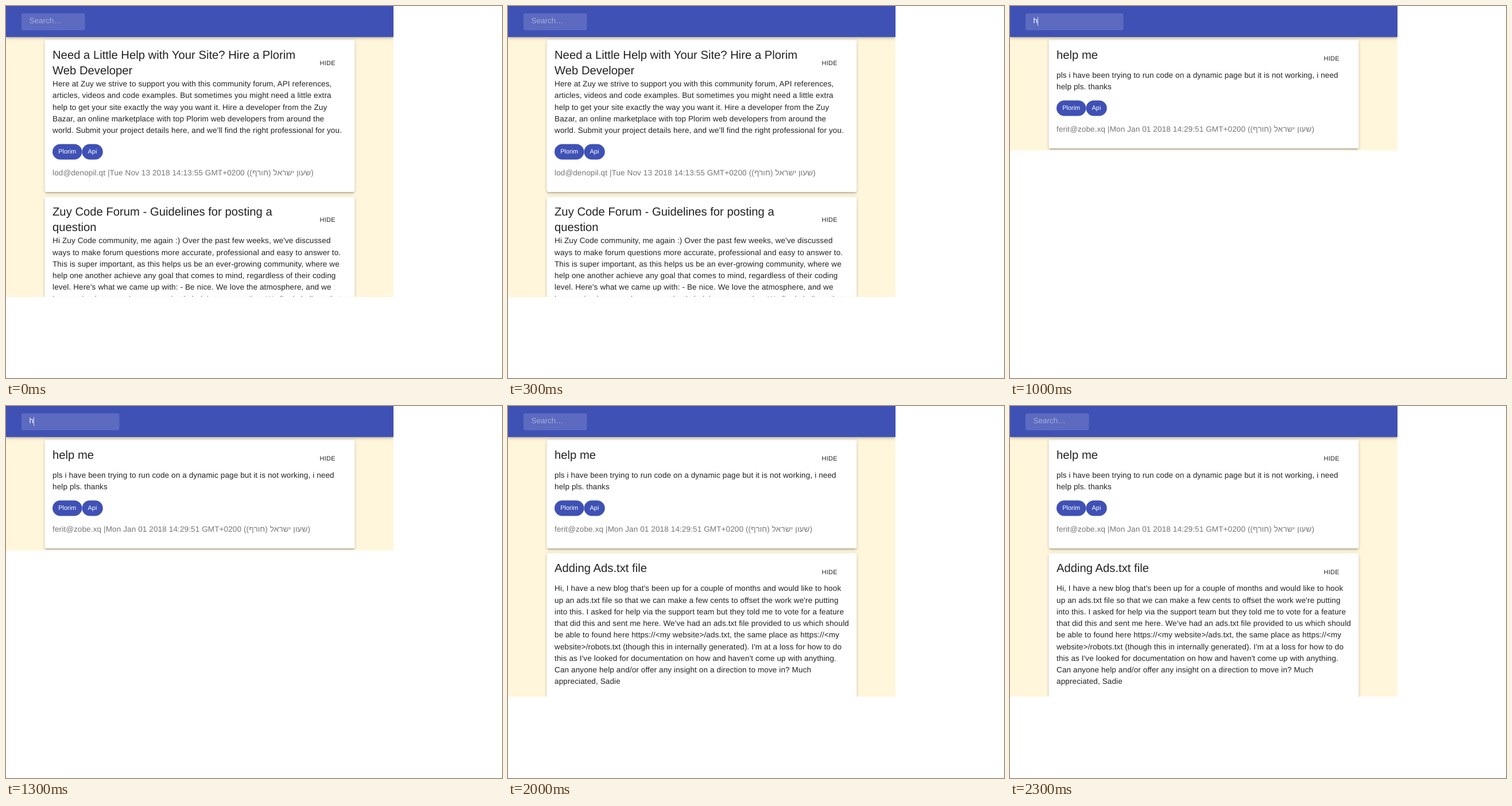
Write an HTML page that moves like this. It is 864 by 648 pixels and loops after 2.5 s.

```html
<!DOCTYPE html>
<html lang="en">
<head>
<meta charset="utf-8">
<title>Ticket list</title>
<style>
  html, body { margin: 0; width: 100%; height: 100%; overflow: hidden; background: #fff; }
  * { box-sizing: border-box; }

  .app {
    position: absolute; left: 0; top: 0; width: 800px; height: 599.7px;
    overflow: hidden; background: #fff;
    transform: scale(.84375); transform-origin: 0 0;
    font: 16px/24px "Liberation Sans", Arial, sans-serif;
    font-variant-ligatures: none; text-rendering: geometricPrecision;
    color: rgba(0, 0, 0, .87);
  }

  /* top bar */
  .bar {
    position: absolute; left: 0; top: 0; width: 800px; height: 64px; z-index: 1;
    background: #3f51b5; color: #fff; white-space: nowrap;
    box-shadow: 0 2px 4px -1px rgba(0,0,0,.2), 0 4px 5px rgba(0,0,0,.14), 0 1px 10px rgba(0,0,0,.12);
  }
  .bar > * { position: absolute; }
  .search {
    left: 32px; top: 14.5px; width: 131px; height: 35px;
    border-radius: 4px; background: rgba(255,255,255,.15);
  }
  .search span { position: absolute; left: 16px; top: 5.5px; }
  .hint { color: rgba(255,255,255,.45); }
  .typed::after {
    content: ""; position: absolute; left: 9px; top: 3px;
    width: 1px; height: 18px; background: #fff;
  }
  .count { left: 165px; top: 19px; letter-spacing: .00938em; }
  .restore { left: 325.5px; top: 20px; font-size: 14px; letter-spacing: .02857em; }

  /* cards */
  .list {
    position: absolute; left: 0; top: 64px; width: 800px; height: 536px;
    padding-top: 5.5px; overflow: hidden; background: #fff6db;
  }
  .card {
    width: 640px; margin: 0 auto 10px; padding: 16px 16px 26px;
    border-radius: 4px; background: #fff;
    box-shadow: 0 3px 3px -2px rgba(0,0,0,.2), 0 3px 4px rgba(0,0,0,.14), 0 1px 8px rgba(0,0,0,.12);
  }
  .head { display: flex; justify-content: space-between; align-items: center; }
  h2 { margin: 0; align-self: flex-start; font-size: 24px; font-weight: 400; line-height: 32px; white-space: pre; }
  .hide {
    width: 64px; height: 30px; margin: 8px; border-radius: 4px;
    font-size: 13px; line-height: 30px; letter-spacing: .02857em; text-align: center;
  }
  .hover { background: #f5f5f5; }
  p { margin: 0; letter-spacing: .00938em; white-space: pre; }
  .tags { display: flex; margin: 15px 0 17px; }
  .tags span {
    height: 32px; padding: 0 12px; border-radius: 16px;
    background: #3f51b5; color: #fff; font-size: 13px; line-height: 32px;
  }
  .meta { color: rgba(0,0,0,.54); }

  /* states, 500 ms each */
  .list, .search, .hint, .typed, .note { animation: 2.5s step-end infinite; }
  .home { animation-name: first; }
  .help { animation-name: help, filter; }
  .errors, .note { animation-name: fourth; }
  .search { animation-name: widen; }
  .hint { animation-name: blank; }
  .typed { animation-name: third; }
  @keyframes first { 0% { opacity: 1 } 20%, 100% { opacity: 0 } }
  @keyframes third { 0% { opacity: 0 } 40% { opacity: 1 } 60%, 100% { opacity: 0 } }
  @keyframes fourth { 0% { opacity: 0 } 60% { opacity: 1 } 80%, 100% { opacity: 0 } }
  @keyframes help { 0% { opacity: 0 } 20% { opacity: 1 } 60% { opacity: 0 } 80%, 100% { opacity: 1 } }
  @keyframes filter { 0% { height: 536px } 40% { height: 234px } 60%, 100% { height: 536px } }
  @keyframes widen { 0% { width: 131px } 40% { width: 202px } 60%, 100% { width: 131px } }
  @keyframes blank { 0% { opacity: 1 } 40% { opacity: 0 } 60%, 100% { opacity: 1 } }
</style>
</head>
<body>
<div class="app">
  <div class="bar">
    <div class="search"><span class="hint">Search…</span><span class="typed">h</span></div>
    <span class="count note">2 Tickets are hidden</span>
    <span class="restore note">RESTORE</span>
  </div>

  <div class="list home">
    <div class="card">
      <div class="head"><h2>Need a Little Help with Your Site? Hire a Plorim
Web Developer</h2><div class="hide">HIDE</div></div>
      <p>Here at Zuy we strive to support you with this community forum, API references,
articles, videos and code examples. But sometimes you might need a little extra
help to get your site exactly the way you want it. Hire a developer from the Zuy
Bazar, an online marketplace with top Plorim web developers from around the
world. Submit your project details here, and we’ll find the right professional for you.</p>
      <div class="tags"><span>Plorim</span><span>Api</span></div>
      <p class="meta">lod@denopil.qt |Tue Nov 13 2018 14:13:55 GMT+0200 (שעון ישראל (חורף))</p>
    </div>
    <div class="card">
      <div class="head"><h2>Zuy Code Forum - Guidelines for posting a
question</h2><div class="hide">HIDE</div></div>
      <p>Hi Zuy Code community, me again :) Over the past few weeks, we've discussed
ways to make forum questions more accurate, professional and easy to answer to.
This is super important, as this helps us be an ever-growing community, where we
help one another achieve any goal that comes to mind, regardless of their coding
level. Here's what we came up with: - Be nice. We love the atmosphere, and we
love seeing how members are patiently helping one another. We firmly believe that</p>
    </div>
  </div>

  <div class="list help">
    <div class="card">
      <div class="head"><h2>help me</h2><div class="hide">HIDE</div></div>
      <p>pls i have been trying to run code on a dynamic page but it is not working, i need
help pls. thanks</p>
      <div class="tags"><span>Plorim</span><span>Api</span></div>
      <p class="meta">ferit@zobe.xq |Mon Jan 01 2018 14:29:51 GMT+0200 (שעון ישראל (חורף))</p>
    </div>
    <div class="card">
      <div class="head"><h2>Adding Ads.txt file</h2><div class="hide">HIDE</div></div>
      <p>Hi, I have a new blog that's been up for a couple of months and would like to hook
up an ads.txt file so that we can make a few cents to offset the work we're putting
into this. I asked for help via the support team but they told me to vote for a feature
that did this and sent me here. We've had an ads.txt file provided to us which should
be able to found here https://&lt;my website&gt;/ads.txt, the same place as https://&lt;my
website&gt;/robots.txt (though this in internally generated). I'm at a loss for how to do
this as I've looked for documentation on how and haven't come up with anything.
Can anyone help and/or offer any insight on a direction to move in? Much
appreciated, Sadie</p>
      <div class="tags"></div>
    </div>
  </div>

  <div class="list errors">
    <div class="card">
      <div class="head"><h2>Notifications not working</h2><div class="hide hover">HIDE</div></div>
      <p>Hi I was working with zuy crm backend notificatication and just stoped working. See
the code bellow CRM Backend code import zuyCrm from 'zuy-crm-backend'; export
function notifySiteContributors(body, titulo, acao, url) { zuyCrm.notifications.notify(
body, ["Mobile", "Browser", "Dashboard"], { "title": titulo, "actionTitle": acao,
"actionTarget": { "url": url }, "recipients": { "role": "All_Contributors" } }) } frontend
code import { notifySiteContributors } from 'backend/CRM'; export function
botaofinalizar_click(event) { let itemObj = $w("#dataset3").getCurrentItem(); let os =
itemObj.title.replace('/', '%2F') let link = 'www.felomira.vom/propostas-pedidos-
novas-/' + os $w('#text217').show() notifySiteContributors( String('OS ' +
$w('#osText').text + ' ' + $w('#text207').text + ' ' + $w('#text208').text + ' ' +
$w('#text214').text), String('Cotação de peça respondida por ' + $w('#text223').text),
'VEJA AGORA A RESPOSTA', link) } The error =&gt; Unhandled rejection Error: server
responded with 400 - {"message":"","details":{}} at handleServerError (/dynamic-
modules/edm_root/2b595510-de9c-11e9-aaa2-
279ac5c14f62/node_modules/@zuy/zuy-crm-backend/src/notifications/api.ts:162:11)
at Object.&lt;anonymous&gt; (/dynamic-modules/edm_root/2b595510-de9c-11e9-aaa2-
279ac5c14f62/node_modules/@zuy/zuy-crm-backend/src/notifications/api.ts:109:9)
at Generator.throw (&lt;anonymous&gt;) at rejected (/dynamic-
modules/edm_root/2b595510-de9c-11e9-aaa2-
279ac5c14f62/node_modules/@zuy/zuy-crm</p>
    </div>
  </div>
</div>
</body>
</html>
```
